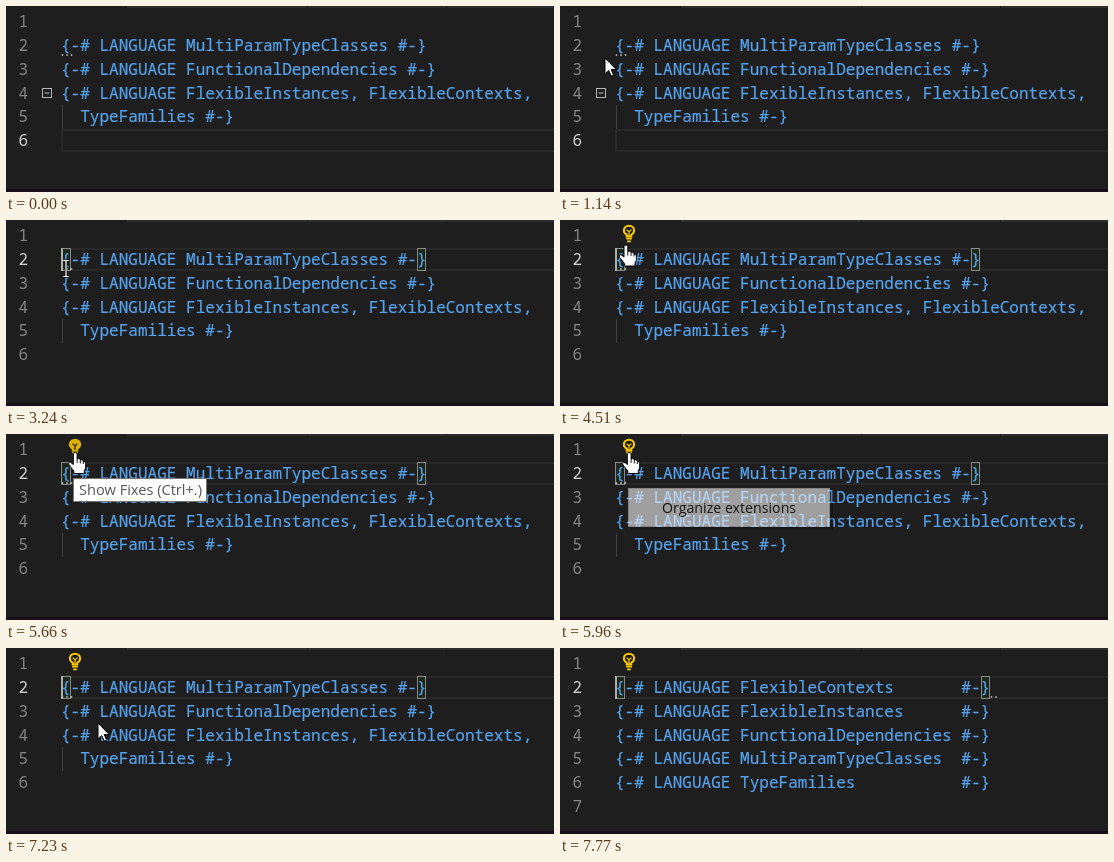
An HTML page that plays this animation: 548 by 186 pixels, repeating every 8000 ms.

```html
<!DOCTYPE html>
<html lang="en">
<head>
<meta charset="utf-8">
<title>Organize extensions</title>
<style>
html, body { margin: 0; width: 100%; height: 100%; overflow: hidden; background: #1e1e1e; }
svg { display: block; width: 548px; height: 186px; }
text { white-space: pre; }
.mono { font: 16.04px "Noto Sans Mono", "DejaVu Sans Mono", monospace; }
.ui { font: 14.2px "Open Sans", "Noto Sans", sans-serif; }
.code { fill: #56a3ee; stroke: #56a3ee; stroke-width: .2; }
.num { fill: #858585; text-anchor: end; }
.num.on { fill: #d0d0d0; }
.match { fill: #00640022; stroke: #888; }
.cursor { fill: #fff; stroke: #000; stroke-linejoin: round; }
</style>
</head>
<body>
<svg viewBox="0 0 548 186">
  <rect width="548" height="186" fill="#1e1e1e"/>
  <path d="M121 1H301M302 1H440M441 1H548" stroke="#2d2d2d" stroke-width="2"/>
  <rect y="183" width="548" height="3" fill="#170f18"/>

  <g id="numbers"></g>
  <rect id="line" x="56" width="500" height="21" fill="none" stroke="#282828" stroke-width="2"/>
  <rect id="range" x="55" y="28" width="19" height="23" fill="#264f78" opacity=".25"/>
  <rect id="open" class="match" x="55.5" y="28.5" width="9" height="22"/>
  <rect id="close" class="match" y="28.5" width="8" height="22"/>
  <g id="before"><path d="M56.5 99V123" stroke="#404040"/></g>
  <g id="after"></g>

  <g id="fold" fill="none" stroke="#b5b5b5">
    <rect x="36.5" y="82.5" width="9" height="9"/>
    <path d="M38.5 87H43.5"/>
  </g>
  <g id="hint" fill="#eee" opacity=".7">
    <circle cx="56.5" cy="49" r=".9"/><circle cx="61" cy="49" r=".9"/><circle cx="65.5" cy="49" r=".9"/>
  </g>
  <g id="hintEnd" fill="#eee" opacity=".7">
    <circle cx="431.5" cy="49" r=".9"/><circle cx="436" cy="49" r=".9"/>
  </g>
  <rect id="caret" x="55" y="28" width="2" height="23" fill="#aeafad"/>

  <g id="bulb" stroke="#fc0" stroke-width="2" fill="none">
    <path id="glass" d="M66.7 16.5V14.7Q63.9 13 63.9 10.4A5 4.6 0 0 1 74.1 10.4Q74.1 13 71.3 14.7V16.5Z"/>
    <path id="wire" d="M66.6 9.6L69 11.9 71.4 9.6M69 11.9V16" stroke-width="1.2"/>
    <path d="M66.2 18.7H71.8M67.2 21.4H70.8" stroke-width="1.7"/>
  </g>

  <g id="message">
    <rect x="55.5" y="-.5" width="254" height="28" fill="#252526" stroke="#454545"/>
    <text class="mono" x="62" y="17.5" fill="#dcdcdc">Extension are unorganised</text>
  </g>
  <g id="tip">
    <rect x="67.5" y="44.5" width="133" height="23" fill="#fff" stroke="#767676"/>
    <text class="ui" x="73" y="61" fill="#575757" style="font-size:14.6px">Show Fixes (Ctrl+.)</text>
  </g>
  <g id="menu">
    <rect x="71" y="57" width="202" height="39" fill="#000" opacity=".35"/>
    <rect x="68.5" y="54.5" width="201" height="38" fill="#f2f2f2" stroke="#ccc"/>
    <rect id="item" x="72" y="58" width="194" height="31" fill="#e9e9e9"/>
    <text class="ui" x="102" y="79" fill="#111">Organize extensions</text>
  </g>

  <path id="arrow" class="cursor" d="M0 0V16L3.7 12.6 6.2 18 8.6 17 6.2 11.6H11.3Z"/>
  <g id="beam" fill="none">
    <path d="M-3-8H-1Q0-8 0-7Q0-8 1-8H3M0-7V7M-3 8H-1Q0 8 0 7Q0 8 1 8H3" stroke="#111" stroke-width="2.4"/>
    <path d="M-3-8H-1Q0-8 0-7Q0-8 1-8H3M0-7V7M-3 8H-1Q0 8 0 7Q0 8 1 8H3" stroke="#fff" stroke-width="1.2"/>
  </g>
  <g id="hand">
    <path class="cursor" d="M-2 1.5Q-2 0 0 0Q1.8 0 1.8 1.5V6.5Q3 5.6 4.6 6.4 5 7 5 7.5 6.6 6.7 7.8 8 8 8.6 8 9 10.4 8.6 10.4 11V14.5Q10.4 16 9 18V21H-1.5V18.5L-6.3 12.5Q-7.6 10.5-6 9.8-4.5 9.5-2 12Z"/>
    <path d="M1.8 6.5V10.5M5 7.5V11M8 9V11.5" stroke="#000" stroke-width=".9"/>
  </g>
</svg>
<script>
const LOOP = 8000, PITCH = 23.75, BASE = 21.25;
const CLICK = 3110, APPLY = 7290;
const $ = id => document.getElementById(id);

function addText(parent, cls, x, row, str) {
  const el = document.createElementNS("http://www.w3.org/2000/svg", "text");
  el.setAttribute("class", "mono " + cls);
  el.setAttribute("x", x);
  el.setAttribute("y", BASE + row * PITCH);
  el.textContent = str;
  return parent.appendChild(el);
}

const numbers = [1, 2, 3, 4, 5, 6, 7].map((n, i) => addText($("numbers"), "num", 22, i, n));

[
  "{-# LANGUAGE MultiParamTypeClasses #-}",
  "{-# LANGUAGE FunctionalDependencies #-}",
  "{-# LANGUAGE FlexibleInstances, FlexibleContexts,",
  "  TypeFamilies #-}"
].forEach((s, i) => addText($("before"), "code", 55, i + 1, s));

["FlexibleContexts", "FlexibleInstances", "FunctionalDependencies", "MultiParamTypeClasses", "TypeFamilies"]
  .forEach((s, i) => addText($("after"), "code", 55, i + 1, `{-# LANGUAGE ${s.padEnd(22)} #-}`));

// time, cursor shape, x, y
const moves = [
  [0, ""],
  [760, "arrow", -4, 54], [840, "arrow", 10, 49], [910, "arrow", 22, 46],
  [990, "arrow", 33, 47], [1060, "arrow", 41, 50], [1140, "arrow", 45, 52],
  [1370, "arrow", 48, 52], [1540, "arrow", 51, 51], [1620, "arrow", 53, 51],
  [1770, "beam", 56, 52], [1850, "beam", 58, 50], [2090, "beam", 60, 48.5],
  [3720, "beam", 60, 46], [3800, "beam", 61, 43], [3870, "beam", 62, 39],
  [3950, "beam", 64, 34], [4020, "beam", 65, 30], [4100, "beam", 66, 27],
  [4510, "hand", 66, 25], [4590, "hand", 67, 23], [4660, "hand", 68, 20], [4820, "hand", 69.3, 18.5],
  [6020, "arrow", 71, 19], [6340, "arrow", 75, 30], [6400, "arrow", 81, 46],
  [6450, "arrow", 88, 60], [6490, "arrow", 91, 66], [6580, "arrow", 92, 70],
  [6670, "arrow", 92, 73], [6820, "arrow", 92, 75],
  [APPLY, "beam", 93, 92], [7690, ""]
];

// spans in which each part is visible
const spans = {
  range: [[2240, CLICK]], before: [[0, APPLY]], after: [[APPLY, LOOP]],
  hint: [[0, APPLY]], hintEnd: [[7370, LOOP]],
  open: [[3240, LOOP]], close: [[3240, APPLY], [7690, LOOP]],
  caret: [[CLICK, 3640], [4170, 4700], [5180, 5660], [6020, 6450], [6970, LOOP]],
  bulb: [[3410, LOOP]], item: [[6400, APPLY]]
};

// parts that fade: in from, in to, out from, out to
const fades = {
  fold: [-1, 0, 1770, 2300],
  message: [2240, 2380, 3110, 3170],
  tip: [5030, 5180, 5800, 5810],
  menu: [5870, 6020, 7140, 7220]
};

const ramp = (t, a, b) => Math.min(1, Math.max(0, (t - a) / (b - a)));
const show = (id, on) => { $(id).style.display = on ? "" : "none"; };

function draw(t) {
  for (const id in spans) show(id, spans[id].some(([a, b]) => t >= a && t < b));
  for (const id in fades) {
    const [a, b, c, d] = fades[id];
    $(id).style.opacity = ramp(t, a, b) * (1 - ramp(t, c, d));
  }

  const active = t < CLICK ? 6 : 2;
  numbers.forEach((el, i) => el.classList.toggle("on", i + 1 === active));
  numbers[6].style.display = t < APPLY ? "none" : "";
  $("line").setAttribute("y", 29 + (active - 2) * PITCH);
  $("close").setAttribute("x", t < APPLY ? 411.5 : 421.5);

  const hover = t >= 4660 && t < 5870;
  $("bulb").setAttribute("stroke", hover ? "#ddb100" : "#fc0");
  $("glass").setAttribute("fill", hover ? "#ddb100" : "none");
  $("wire").setAttribute("stroke", hover ? "#1e1e1e" : "#fc0");

  const [, shape, x, y] = moves.filter(m => m[0] <= t).pop();
  for (const id of ["arrow", "beam", "hand"]) show(id, id === shape);
  if (shape) $(shape).setAttribute("transform", `translate(${x} ${y})`);
}

const start = performance.now();
function tick() {
  draw((performance.now() - start) % LOOP);
  requestAnimationFrame(tick);
}
tick();
</script>
</body>
</html>
```
